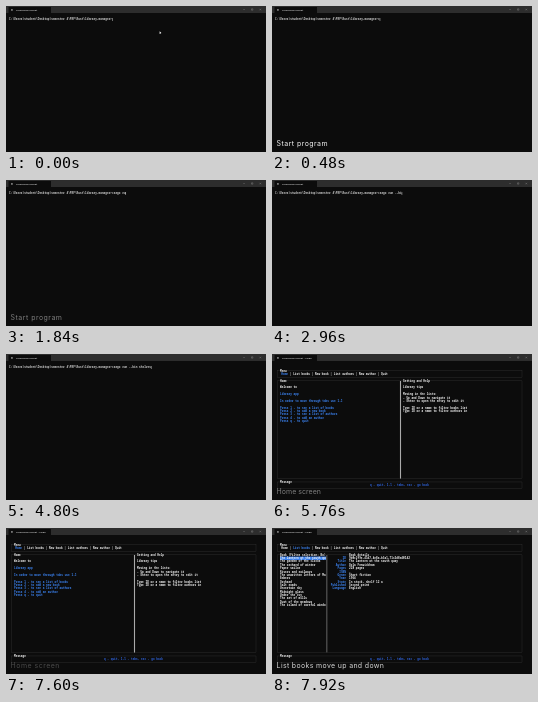
Recreate the animation shown at these times as an HTML page with a canvas. Size 260x146 px, loop 8000 ms.

```html
<!DOCTYPE html>
<html lang="en">
<head>
<meta charset="utf-8">
<title>Terminal library demo</title>
<style>
  html, body { margin: 0; width: 100%; height: 100%; overflow: hidden; background: #0c0c0c; }
  canvas { display: block; width: 100vw; height: 100vh; }
</style>
</head>
<body>
<canvas id="stage"></canvas>
<script>
const W = 260, H = 146, LOOP = 8000;
const BG = '#0c0c0c', WHITE = '#f2f2f2', GREY = '#cccccc', BLUE = '#3b82f0', LINE = '#4a4a4a';
const PITCH = 1.69;                      // terminal character width
const MONO_SIZE = PITCH / 0.6;
const rowY = r => 13.4 + 3.37 * r;       // centre of a terminal row

const canvas = document.getElementById('stage');
const ctx = canvas.getContext('2d');

const PROMPT = 'C:\\Users\\student\\Desktop\\semester 4\\PRP\\Rust\\library-manager>';
const COMMAND = 'cargo run --bin shelves';
const KEYS = [400, 720, 1000, 1190, 1360, 1520, 1680, 1840, 1990, 2230, 2710, 2750, 2790,
  2950, 3110, 3190, 3350, 3830, 3910, 3990, 4310, 4550, 4790];
const RUN_AT = 5510, HOME_AT = 5670, LIST_AT = 7690;

const CAPTIONS = [
  { text: 'Start program', start: 60, end: 1160 },
  { text: 'Home screen', start: 5660, end: 6840 },
  { text: 'List books move up and down', start: 7660, end: 9000 }
];

const MENU = ['Home', 'List books', 'New book', 'List authors', 'New author', 'Quit'];

const HOME_LEFT = [
  [6, 'Welcome to', WHITE], [8, 'Library app', BLUE],
  [10, 'In order to move through tabs use 1-5', BLUE],
  [12, 'Press 1 - to see a list of books', BLUE],
  [13, 'Press 2 - to add a new book', BLUE],
  [14, 'Press 3 - to see a list of authors', BLUE],
  [15, 'Press 4 - to add an author', BLUE],
  [16, 'Press q - to quit', BLUE]
];
const HOME_RIGHT = [
  [6, 'Library tips'], [8, 'Moving in the lists:'], [9, '- Up and Down to navigate it'],
  [10, '- Enter to open the entry to edit it'],
  [12, 'Type ID or a name to filter books list'],
  [13, 'Type ID or a name to filter authors in']
];
const BOOKS = [
  'The lantern at the south quay', 'The garden of the clocks', 'The orchard of winter',
  'Paper sailor', 'Rivers and railways', 'The unwritten letters of May', 'Embers', 'Orchard',
  'Salt roads', 'Uncertain sky', 'Midnight glass', 'Under the ivy', 'The art of mills',
  'Dust of the meadows', 'The island of careful windows'
];
const DETAILS = [
  [5, 'ID', '9b0c2f9e-41d7-4e8a-b3a5-71c2d8e40142'],
  [6, 'Title', 'The lantern at the south quay'],
  [7, 'Author', 'Orla Fenwickham'], [8, 'Pages', '228 pages'],
  [9, 'ISBN', '-'], [10, 'Genre', 'Short fiction'], [11, 'Year', '1964'],
  [12, 'State', 'In stock, shelf 12 a'], [13, 'Published', 'Second print'], [14, 'Language', 'English']
];

const clamp = v => Math.max(0, Math.min(1, v));

function rect(x, y, w, h, color) {
  ctx.fillStyle = color;
  ctx.fillRect(x, y, w, h);
}

// Large glyphs under a uniform scale keep fractional sizes exact.
function write(text, x, y, size, family, color, opts = {}) {
  ctx.save();
  ctx.translate(x, y);
  ctx.scale(0.1, 0.1);
  ctx.font = `${opts.weight || 400} ${size * 10}px ${family}`;
  ctx.letterSpacing = `${(opts.spacing || 0) * 10}px`;
  ctx.textAlign = opts.align || 'left';
  ctx.textBaseline = opts.baseline || 'middle';
  ctx.fillStyle = color;
  ctx.fillText(text, 0, 0);
  ctx.restore();
}

function mono(text, x, row, color = WHITE, align = 'left') {
  write(text, x, rowY(row), MONO_SIZE, '"Noto Sans Mono", monospace', color, { align, weight: 600 });
}

function panel(x, right, top, bottom, title, titleX = x + 2.5) {
  ctx.strokeStyle = LINE;
  ctx.lineWidth = 0.25;
  ctx.strokeRect(x, rowY(top), right - x, rowY(bottom) - rowY(top));
  rect(titleX, rowY(top) - 1, title.length * PITCH, 2, BG);
  mono(title, titleX, top);
}

function divider(x, color) {
  rect(x, rowY(4), 0.8, rowY(33) - rowY(4), color);
}

function drawWindow(t) {
  rect(0, 0, W, H, BG);
  rect(0, 0, W, 7, '#2d2d2d');
  rect(2.5, 1, 42.5, 6, BG);
  rect(5, 3, 1.8, 1.8, '#777');
  const title = 'Command Prompt' + (t >= RUN_AT ? ' - cargo' : '');
  write(title, 10, 4.2, 2.4, '"Open Sans", sans-serif', '#ddd', { weight: 600 });
  ctx.strokeStyle = '#aaa';
  ctx.lineWidth = 0.3;
  ctx.beginPath();
  ctx.moveTo(237.3, 3.5); ctx.lineTo(238.8, 3.5);
  ctx.rect(245.5, 2.8, 1.4, 1.4);
  ctx.moveTo(253.5, 2.8); ctx.lineTo(255, 4.3);
  ctx.moveTo(255, 2.8); ctx.lineTo(253.5, 4.3);
  ctx.stroke();
}

function drawShell(t) {
  const typed = KEYS.filter(k => k <= t).length;
  const line = PROMPT + COMMAND.slice(0, typed);
  mono(line, 3, 0, GREY);
  rect(3 + line.length * PITCH, 12, 0.4, 3, '#fff');
  if (t < 160) drawPointer(153.6, 25.3);
}

function drawPointer(x, y) {
  ctx.fillStyle = '#fff';
  ctx.beginPath();
  ctx.moveTo(x, y);
  ctx.lineTo(x, y + 2.6);
  ctx.lineTo(x + 1.8, y + 1.8);
  ctx.fill();
}

function drawMenu(active) {
  let x = 9.3;
  MENU.forEach((label, i) => {
    mono(label, x, 2, i === active ? BLUE : WHITE);
    x += label.length * PITCH;
    if (i < MENU.length - 1) mono(' | ', x, 2, GREY);
    x += 3 * PITCH;
  });
}

function drawFrame(active) {
  panel(5.5, 250, 1, 3, 'Menu', 8);
  drawMenu(active);
  panel(5.5, 250, 34, 36, 'Message', 8);
  mono('q - quit, 1-5 - tabs, esc - go back', 127.5, 35, '#2f62d8', 'center');
}

function drawHome() {
  drawFrame(0);
  panel(5.5, 128, 4, 33, 'Home', 8);
  panel(129, 250, 4, 33, 'Getting and Help', 131);
  divider(128.1, '#d0d0d0');
  HOME_LEFT.forEach(([row, text, color]) => mono(text, 8, row, color));
  HOME_RIGHT.forEach(([row, text]) => mono(text, 131, row));
}

function drawList() {
  drawFrame(1);
  panel(5.5, 54.5, 4, 33, 'Book (Filter selection: No)', 8);
  panel(55.5, 250, 4, 33, 'Book details', 77);
  divider(54.4, '#666');
  rect(8, rowY(5) - 1.7, 46, 3.4, BLUE);
  BOOKS.forEach((book, i) => mono(book.slice(0, 27), 8, 5 + i));
  DETAILS.forEach(([row, label, value]) => {
    mono(label, 74, row, BLUE, 'right');
    mono(value, 77, row);
  });
}

function drawCaption({ text, start, end }, t) {
  if (t < start || t > end + 840) return;
  const enter = 1 - Math.pow(1 - clamp((t - start) / 1000), 6);
  const leave = 1 - Math.pow(clamp((t - end) / 840), 3);
  ctx.globalAlpha = enter * leave;
  write(text, 4.6, 139.8, 7, 'Inter, sans-serif', '#fff',
    { spacing: -0.38 + 0.85 * enter, baseline: 'alphabetic' });
  ctx.globalAlpha = 1;
}

function draw(t) {
  drawWindow(t);
  if (t < HOME_AT) drawShell(t);
  else if (t < LIST_AT) drawHome();
  else drawList();
  CAPTIONS.forEach(c => drawCaption(c, t));
}

function resize() {
  const dpr = window.devicePixelRatio || 1;
  canvas.width = Math.round(innerWidth * dpr);
  canvas.height = Math.round(innerHeight * dpr);
  ctx.setTransform(canvas.width / W, 0, 0, canvas.height / H, 0, 0);
}

const origin = performance.now();
function tick() {
  draw((performance.now() - origin) % LOOP);
  requestAnimationFrame(tick);
}

addEventListener('resize', resize);
resize();
tick();
</script>
</body>
</html>
```
